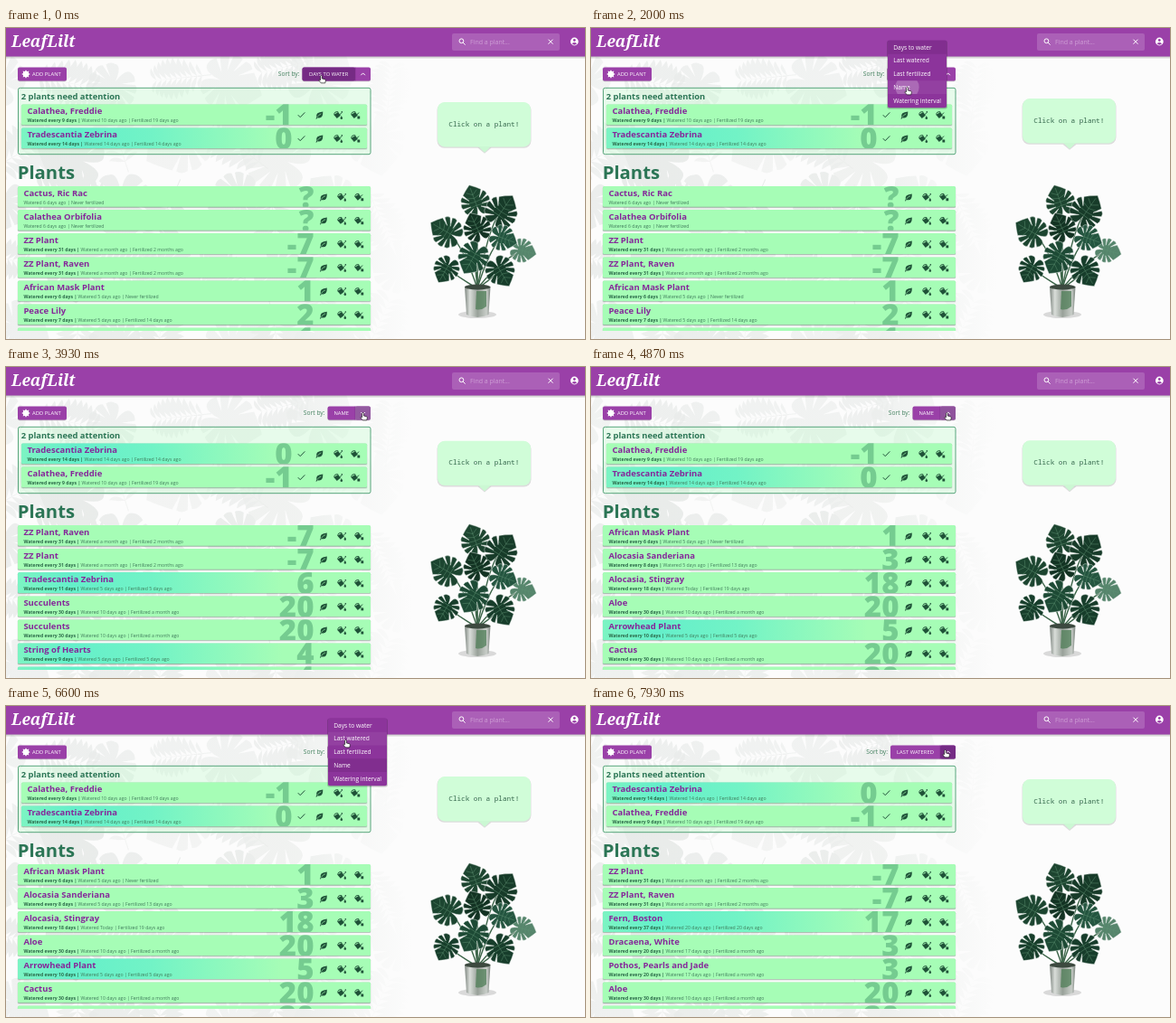
Recreate the animation shown at these times as an HTML page. Size 640 px wide and 344 px high, loop 8000 ms.

```html
<!DOCTYPE html>
<html lang="en">
<head>
<meta charset="utf-8">
<title>LeafLilt</title>
<style>
html, body { margin: 0; width: 100%; height: 100%; overflow: hidden; background: #fcfcfc; }
#stage { display: block; width: 100vw; height: 100vh; font-family: "Open Sans", "Noto Sans", sans-serif; }
.title { font-size: 9.5px; font-weight: 700; fill: #85279a; }
.info { font-size: 5.15px; fill: #3f7a5a; }
.info .every { font-weight: 700; fill: #2a6848; }
.count { font-size: 33px; font-weight: 800; fill: #2c8257; fill-opacity: .4; text-anchor: end; }
.icon { fill: #1f5238; }
.line { fill: none; stroke: #1f5238; stroke-width: 1; }
.head { font-weight: 700; fill: #2b7555; }
.btn { font-size: 5.8px; fill: #fff; letter-spacing: .05px; }
.item { font-size: 6.65px; fill: #fff; }
</style>
</head>
<body>
<svg id="stage" viewBox="0 0 640 344"></svg>
<script>
const LOOP = 8000;
const stage = document.getElementById('stage');
const clamp = v => Math.max(0, Math.min(1, v));
const ease = v => v * v * (3 - 2 * v);
const rect = (x, y, w, h, fill, r = 0, more = '') =>
  `<rect x="${x}" y="${y}" width="${w}" height="${h}" rx="${r}" fill="${fill}" ${more}/>`;
const text = (x, y, cls, str, more = '') => `<text x="${x}" y="${y}" class="${cls}" ${more}>${str}</text>`;
const at = (x, y, body, rot = 0) => `<g transform="translate(${x} ${y}) rotate(${rot})">${body}</g>`;

// ---- foliage ----
// Heart-shaped blade, tip up, cut by narrow slits that lean towards the stalk.
function leafPath(r) {
  const p = (a, k) => `${(Math.sin(a) * k * r).toFixed(1)} ${(-Math.cos(a) * k * r).toFixed(1)}`;
  const edge = a => .93 + .27 * Math.exp(-8 * a * a);
  const cuts = [-2.3, -1.8, -1.3, -.8, .8, 1.3, 1.8, 2.3];
  let d = `M0 ${r * .3}Q${p(-3.05, .95)} ${p(-2.75, .95)}`;
  let last = -2.75;
  for (const a of [...cuts, 2.75]) {
    const end = a === 2.75 ? a : a - .07;
    if (last < 0 && a > 0) d += `Q${p(-.4, 1)} ${p(0, 1.2)}Q${p(.4, 1)} ${p(end, edge(end))}`;
    else d += `Q${p((last + end) / 2, 1.02)} ${p(end, edge(end))}`;
    if (end !== a) d += `L${p(a + Math.sign(a) * .2, .42)}L${p(a + .07, edge(a))}`;
    last = a + .07;
  }
  return d + `Q${p(3.05, .95)} 0 ${r * .3}Z`;
}

function veins(r) {
  let d = `M0 ${r * .3}V${-r}`;
  for (const s of [-1, 1])
    for (let i = 0; i < 4; i++)
      d += `M0 ${r * (.2 - i * .24)}L${s * r * (.72 - i * .12)} ${r * (.25 - i * .34)}`;
  return d;
}

function frondPath(len) {
  let d = `M-.6 ${len}L0 ${-len}L.6 ${len}Z`;
  for (let i = 0; i < 10; i++) {
    const y = len * (.7 - i * .17), w = len * (.3 + .4 * Math.sin((i + 1) / 11 * Math.PI));
    for (const s of [-1, 1])
      d += `M0 ${y}Q${s * w * .5} ${y - w * .7} ${s * w} ${y - w * .35}Q${s * w * .5} ${y - w * .1} 0 ${y}Z`;
  }
  return d;
}

function wallpaper() {
  let seed = 11, out = '';
  const rnd = () => (seed = seed * 16807 % 2147483647) / 2147483647;
  for (let row = 0; row < 5; row++)
    for (let col = 0; col < 8; col++) {
      const x = col * 59 + rnd() * 30 - 8, y = 42 + row * 70 + rnd() * 34;
      const size = 32 + rnd() * 14;
      const d = (row + col) % 2 ? frondPath(size) : leafPath(size * .85);
      out += at(x.toFixed(1), y.toFixed(1), `<path d="${d}" fill="#e7eae8" opacity="${(.5 + rnd() * .5).toFixed(2)}"/>`, rnd() * 360 | 0);
    }
  return out + rect(0, 30, 640, 314, 'url(#fade)');
}

function monstera() {
  const leaves = [
    [570, 246, 14, 105, '#56856c'], [519, 193, 17, -20, '#1d4530'], [547, 204, 19, 35, '#173b29'],
    [488, 226, 18, -60, '#1c4530'], [548, 232, 15, 110, '#245540'], [521, 222, 16, -25, '#133323'],
    [487, 266, 15, -150, '#173e2b'], [517, 253, 18, -150, '#1d4a35'], [546, 268, 17, 150, '#173d2b']];
  let out = `<ellipse cx="521" cy="317" rx="21" ry="4" fill="#000" opacity=".14"/>`;
  for (const [x, y] of leaves)
    out += `<path d="M521 288Q${(x + 521) / 2} ${y + 12} ${x} ${y}" fill="none" stroke="#3b6448" stroke-width="1.4"/>`;
  out += `<path d="M507 286H535.500L533.500 317Q521 323 509 317Z" fill="url(#pot)"/><ellipse cx="521.2" cy="286.5" rx="14.2" ry="3" fill="#3c493f"/>
    <path d="M520 291H531V308Q525 313 519 311Z" fill="#4f7d57" opacity=".75"/>`;
  for (const [x, y, r, rot, fill] of leaves)
    out += at(x, y, `<path d="${leafPath(r)}" fill="${fill}" stroke="#eef4f0" stroke-width=".4"/>
      <path d="${veins(r)}" fill="none" stroke="#5f9273" stroke-width=".6" opacity=".7"/>`, rot);
  return out;
}

// ---- plant rows ----
const can = `<path class="icon" d="M-4.6 -.3L.2 -3.2L2.8 .6L-1.2 3.8Z"/><path class="line" d="M-4 0Q-4.800 -4 .2 -3.4M1.800 -.3L4 -2.6"/>`;
const icons = {
  check: '<path class="line" d="M-3.7 0L-1.3 2.5L3.8 -2.8"/>',
  leaf: '<path class="icon" d="M-4 4.2L-3.2 2.2Q-4.5 -2.8 3.8 -3.6Q4 4.6 -2.3 3L-3.3 4.5Z"/><path d="M-2.5 2.4Q-1 -.3 2 -1.4" stroke="#a6fdb6" stroke-width=".6" fill="none"/>',
  water: can + '<path class="icon" d="M3.8 .8L4.9 3A1.2 1.2 0 1 1 2.7 3Z"/><circle class="icon" cx="4.3" cy="-3.3" r=".8"/>',
  feed: can + '<path class="icon" d="M2.4 1.3H5.2V4.2H2.4Z"/>'
};

// name | interval | watered | fertilized | days left | both due together
const plants = {
  freddie: 'Calathea, Freddie|9|10 days ago|19 days ago|-1',
  zebrina: 'Tradescantia Zebrina|14|14 days ago|14 days ago|0|1',
  ricrac: 'Cactus, Ric Rac||6 days ago||?',
  orbifolia: 'Calathea Orbifolia||6 days ago||?',
  zz: 'ZZ Plant|31|a month ago|2 months ago|-7',
  raven: 'ZZ Plant, Raven|31|a month ago|2 months ago|-7',
  mask: 'African Mask Plant|6|5 days ago||1',
  lily: 'Peace Lily|7|5 days ago|14 days ago|2',
  sanderiana: 'Alocasia Sanderiana|8|5 days ago|13 days ago|3',
  stingray: 'Alocasia, Stingray|18|Today|19 days ago|18',
  aloe: 'Aloe|30|10 days ago|a month ago|20',
  arrowhead: 'Arrowhead Plant|10|5 days ago|5 days ago|5|1',
  cactus: 'Cactus|30|10 days ago|a month ago|20',
  zebrina2: 'Tradescantia Zebrina|11|5 days ago|5 days ago|6|1',
  succulents: 'Succulents|30|10 days ago|a month ago|20',
  hearts: 'String of Hearts|9|5 days ago|5 days ago|4|1',
  fern: 'Fern, Boston|37|20 days ago|20 days ago|17|1',
  dracaena: 'Dracaena, White|20|17 days ago|a month ago|3',
  pothos: 'Pothos, Pearls and Jade|20|17 days ago|a month ago|3'
};

function plantRow(key, x, y, w, urgent) {
  const [name, every, watered, fed, count, due] = plants[key].split('|');
  const info = (every && `<tspan class="every">Watered every ${every} days |</tspan> `) +
    `Watered ${watered} | ${fed ? 'Fertilized ' + fed : 'Never fertilized'}`;
  const spots = urgent ? { check: 309.5, leaf: 329.5, water: 350, feed: 369 } : { leaf: 338, water: 358, feed: 377 };
  let body = rect(0, 0, w, 23, due ? 'url(#due)' : '#a6fdb6', 1.5) +
    text(urgent ? 299.5 : 327.5, 24, 'count', count) + text(6.4, 11.1, 'title', name) + text(6.4, 20.1, 'info', info);
  for (const k in spots) body += at(spots[k], 12, icons[k]);
  return rect(x - .3, y + 1, w + .6, 23.2, '#376b49', 1.5, 'opacity=".2"') + rect(x, y + .6, w, 22.8, '#376b49', 1.5, 'opacity=".4"') +
    `<svg x="${x}" y="${y}" width="${w}" height="22.8">${body}</svg>`;
}

// ---- timeline ----
const byName = 'mask sanderiana stingray aloe arrowhead cactus aloe';
const states = [
  { t: 0, label: 'DAYS TO WATER', x: 327.5, up: true, top: 'freddie zebrina', list: 'ricrac orbifolia zz raven mask lily mask' },
  { t: 2180, label: 'NAME', x: 355.5, up: true, top: 'freddie zebrina', list: byName },
  { t: 3780, label: 'NAME', x: 355.5, up: false, top: 'zebrina freddie', list: 'raven zz zebrina2 succulents succulents hearts hearts' },
  { t: 4620, label: 'NAME', x: 355.5, up: true, top: 'freddie zebrina', list: byName },
  { t: 7130, label: 'LAST WATERED', x: 331, up: true, top: 'zebrina freddie', list: 'zz raven fern dracaena pothos aloe aloe' }
];
const options = ['Days to water', 'Last watered', 'Last fertilized', 'Name', 'Watering interval'];
const menus = [
  { from: 720, to: 2080, x: 328, selected: 0 },
  { from: 5780, to: 7030, x: 356, selected: 3 }
];
const path = [
  [0, 348.5, 52.5], [900, 348.5, 52.5], [1700, 349.5, 65.5], [2200, 349.5, 65.5], [2850, 388.7, 54.3],
  [3250, 388.7, 54.3], [3600, 394.5, 50.5], [4800, 394.5, 50.5], [5350, 369.5, 51.5], [5950, 369.5, 51.5],
  [6450, 375.5, 37.5], [7100, 375.5, 37.5], [7750, 391.5, 48.5], [8000, 391.5, 48.5]
];
const barTop = 43.6, barHeight = 14.8;
const itemTop = i => 14 + i * 14.75;
const ripples = [
  [670, 327.5, barTop, 58.5, barHeight], [1900, 328, itemTop(3), 65, 14.75], [3780, 386, barTop, 17, barHeight],
  [4620, 386, barTop, 17, barHeight], [5730, 355.5, barTop, 30, barHeight], [6950, 356, itemTop(1), 65, 14.75]
];

// ---- scene ----
const gradient = (id, stops) => `<linearGradient id="${id}">` + stops.map(([o, c, a = 1]) =>
  `<stop offset="${o}" stop-color="${c}" stop-opacity="${a}"/>`).join('') + '</linearGradient>';
const bar = (x, w, fill, more) => rect(x, barTop, w, barHeight, fill, 2, more);
const barShadow = (x, w) => rect(x, barTop + .8, w, barHeight, '#000', 2, 'opacity=".22"');

const stateView = s => `<g class="state" display="none">
  ${s.top.split(' ').map((k, i) => plantRow(k, 17, 84.2 + i * 26, 382, true)).join('')}
  <svg x="0" y="170" width="420" height="165">${s.list.split(' ').map((k, i) => plantRow(k, 13, 5 + i * 26.05, 390, false)).join('')}</svg>
  ${text(s.x - 3, 53.3, '', 'Sort by:', 'font-size="6.7" fill="#43815f" text-anchor="end"')}
  ${barShadow(s.x, 403 - s.x)}${bar(s.x, 403 - s.x, '#9a40a8')}
  ${bar(s.x, 386 - s.x, '#6c267c', 'class="main"')}${bar(386, 17, '#6c267c', 'class="arrow"')}
  <path d="M386 ${barTop}v${barHeight}" stroke="#7a2d88" stroke-width=".6"/>
  ${text((s.x + 386) / 2, 53.2, 'btn', s.label, 'text-anchor="middle"')}
  <path d="M392.3 ${s.up ? 52.2 : 50}l2.3 ${s.up ? -2.3 : 2.3}l2.3 ${s.up ? 2.3 : -2.3}" fill="none" stroke="#fff" stroke-width="1"/></g>`;

const menuView = m => `<g class="menu" opacity="0">${rect(m.x - .8, 14, 66.6, 75.6, '#000', 2, 'opacity=".22"')}
  ${rect(m.x, 13.3, 65, 75, '#8c349b', 2)}${rect(m.x, itemTop(m.selected), 65, 14.75, '#812e8f')}
  ${rect(m.x, 0, 65, 14.75, '#fff', 0, 'class="hover" opacity="0"')}
  ${options.map((o, i) => text(m.x + 6.2, itemTop(i) + 9.7, 'item', o)).join('')}</g>`;

let badge = '<circle r="3.2"/>';
for (let i = 0; i < 8; i++) badge += `<path d="M-1.5 -2L0 -4.8L1.5 -2Z" transform="rotate(${i * 45})"/>`;

stage.innerHTML = `<defs>
  ${gradient('fade', [[0, '#fcfcfc', .05], [.5, '#fcfcfc', .25], [.7, '#fcfcfc', 1], [1, '#fcfcfc', 1]])}
  ${gradient('due', [[0, '#7cf4c3'], [.15, '#64efca'], [.38, '#72f3c6'], [.75, '#a6fdb6'], [1, '#a6fdb6']])}
  ${gradient('pot', [[0, '#7d857f'], [.2, '#d9ddd9'], [.5, '#98a199'], [.85, '#c9cec9'], [1, '#7d857f']])}
  <clipPath id="press"><rect/></clipPath></defs>
  ${rect(0, 0, 640, 344, '#fcfcfc')}${wallpaper()}
  ${rect(0, 31, 640, 1.5, '#000', 0, 'opacity=".22"')}${rect(0, 32.5, 640, 1.5, '#000', 0, 'opacity=".08"')}
  ${rect(0, 0, 640, 31.5, '#9a40a8')}
  ${text(6, 21, '', 'LeafLilt', 'font-family="Noto Serif, serif" font-size="17.5" font-weight="700" font-style="italic" fill="#fff"')}
  ${rect(493, 6, 119, 19, '#fff', 2, 'opacity=".17"')}
  <g fill="none" stroke="#fff"><circle cx="503.4" cy="14.3" r="2.4"/><path d="M505.2 16.2L507.6 18.6M599.5 12.7L604.5 17.7M604.5 12.7L599.5 17.7"/></g>
  ${text(513, 17.7, '', 'Find a plant...', 'font-size="7" fill="#cf9fd6"')}
  <circle cx="628.3" cy="15" r="4.4" fill="#fff"/><circle cx="628.3" cy="13.5" r="1.4" fill="#9a40a8"/><path d="M625.6 17.3Q628.3 14.6 631 17.3Q628.3 20 625.6 17.3Z" fill="#9a40a8"/>
  ${barShadow(13, 54)}${bar(13, 54, '#9a40a8')}
  ${at(22, 51, `<g fill="#fff">${badge}</g>`)}${text(29, 53.2, 'btn', 'ADD PLANT')}
  ${rect(13.5, 66.3, 389.5, 73.4, '#b6f8c3', 2, 'fill-opacity=".3" stroke="#58a57c"')}
  ${text(16.7, 78.7, 'head', '2 plants need attention', 'font-size="9.4"')}
  ${text(12.7, 167.4, 'head', 'Plants', 'font-size="20.3"')}
  ${monstera()}
  <g id="bubble"><rect x="476.5" y="82.8" width="104" height="50" rx="8" fill="#000" opacity=".13"/>
    ${rect(477, 82, 103, 49.4, '#d0fdd8', 8)}
    <path d="M521.500 132.600L529 138.800L536.500 132.600Z" fill="#000" opacity=".13"/>
    <path d="M522 131L529 137.700L536 131Z" fill="#cbf8d3"/>
    ${text(528.3, 108.6, '', 'Click on a plant!', 'text-anchor="middle" font-family="Noto Sans Mono, monospace" font-size="7.65" fill="#34664c"')}</g>
  ${states.map(stateView).join('')}
  ${menus.map(menuView).join('')}
  <g clip-path="url(#press)"><circle id="ripple" fill="#fff"/></g>
  <path id="hand" d="M-1 .8Q0 -.9 1 .8V4L4.500 4.800Q5.700 5.200 5.400 7L4.800 9.500H-.3L-3 6.300Q-2.900 4.700 -1 5.800Z" fill="#fff" stroke="#111" stroke-width=".75"/>`;

const all = sel => [...stage.querySelectorAll(sel)];
const stateNodes = all('.state'), menuNodes = all('.menu');
const bubble = all('#bubble')[0], ripple = all('#ripple')[0], press = all('#press rect')[0], hand = all('#hand')[0];
const set = (node, attrs) => { for (const k in attrs) node.setAttribute(k, attrs[k]); };

function pointer(t) {
  const i = Math.max(1, path.findIndex(p => p[0] > t));
  const [t0, x0, y0] = path[i - 1], [t1, x1, y1] = path[i];
  const k = ease(clamp((t - t0) / (t1 - t0)));
  return [x0 + (x1 - x0) * k, y0 + (y1 - y0) * k];
}

function draw(t) {
  const [x, y] = pointer(t);
  set(hand, { transform: `translate(${x} ${y}) scale(.88)` });
  set(bubble, { transform: `translate(0 ${2 * Math.cos(2 * Math.PI * t / 4300) - 2})` });

  let menuOpen = false;
  menus.forEach((m, i) => {
    const shown = ease(clamp((t - m.from) / 200)) * (1 - ease(clamp((t - m.to) / 150)));
    const scale = t < m.to ? .75 + .25 * shown : 1;
    const cx = m.x + 32, cy = itemTop(m.selected) + 7;
    set(menuNodes[i], { opacity: shown, transform: `translate(${cx} ${cy}) scale(${scale}) translate(${-cx} ${-cy})` });
    const over = Math.floor((y - 14) / 14.75);
    set(menuNodes[i].querySelector('.hover'), { y: itemTop(over), opacity: over === m.selected ? 0 : .06 });
    if (shown > 0) menuOpen = true;
  });

  const now = states.findLastIndex(s => s.t <= t);
  stateNodes.forEach((n, i) => set(n, { display: i === now ? 'inline' : 'none' }));
  const inside = !menuOpen && y > 44 && y < 58;
  const node = stateNodes[now], left = states[now].x;
  set(node.querySelector('.main'), { opacity: inside && x > left && x < 386 ? .8 : 0 });
  set(node.querySelector('.arrow'), { opacity: inside && x >= 386 && x < 403 ? .8 : 0 });

  const hit = ripples.find(r => t >= r[0] && t < r[0] + 500);
  set(ripple, { opacity: 0 });
  if (hit) {
    const age = t - hit[0];
    set(press, { x: hit[1], y: hit[2], width: hit[3], height: hit[4] });
    set(ripple, { cx: x, cy: y, r: age * .13, opacity: .22 * clamp((500 - age) / 300) });
  }
}

const start = performance.now();
function tick() {
  draw((performance.now() - start) % LOOP);
  requestAnimationFrame(tick);
}
tick();
</script>
</body>
</html>
```
